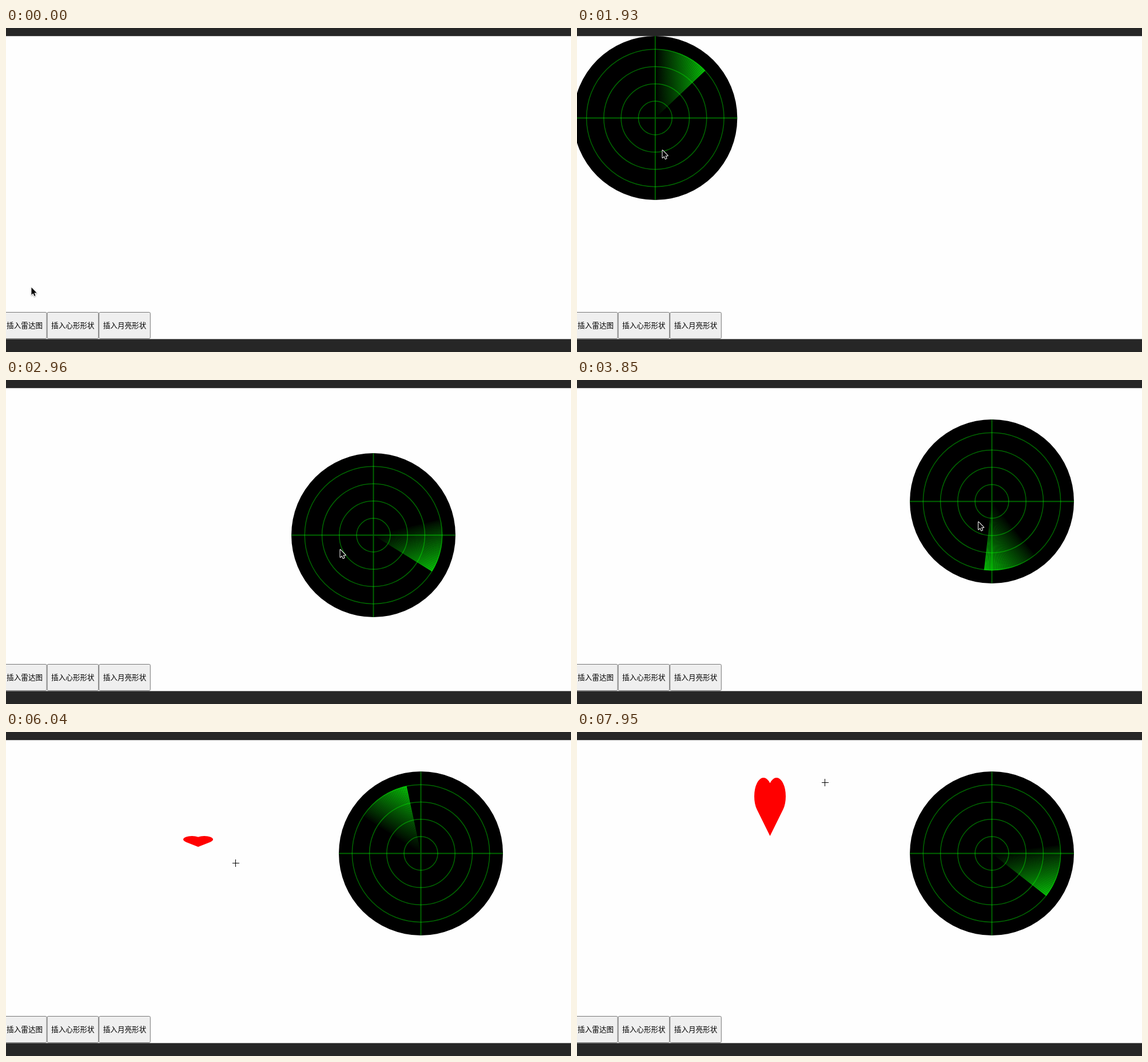
Recreate the animation shown at these times as an HTML page with a canvas. Size 988 px wide and 567 px high, loop 8000 ms.

```html
<!DOCTYPE html>
<html lang="zh">
<head>
<meta charset="utf-8">
<style>
  html, body { margin: 0; height: 100%; overflow: hidden; background: #fefefe; }
  canvas { display: block; }
</style>
</head>
<body>
<canvas id="stage" width="988" height="567"></canvas>
<script>
const ctx = document.getElementById('stage').getContext('2d');
const LOOP = 8000, STEP = 147.2, TAU = Math.PI * 2;
const PRESSES = [8, 32];
const RADAR_IN = 9, GRAB = 15.5, DROP = 25, CROSS_IN = 34, HEART_IN = 40;
const GRIP = [24, -35], ANCHOR = [310, 182];

// The pointer's turning points: [step, x, y]. It also drives the radar and the heart.
const path = [
  [0, 44, 453], [1, 44, 440], [2, 44, 440], [6, 58, 512], [8.5, 58, 512],
  [13, 149, 213], [GRAB, 112.8, 192.5], [20, 584, 296], [20.5, 618.5, 306.5], [22, 680, 316],
  [DROP, 701.5, 247.5], [26, 701.5, 247.5], [30, 116, 515], [33, 116, 515],
  [39, 310, 182], [40.4, 362, 201], [41, 402, 229], [43, 440, 290], [45.5, 310, 304],
  [48.4, 203, 289], [49, 181, 228], [51, 163, 120], [53.4, 365, 80], [54, 434, 88]
];

const clamp = (v, low, high) => Math.min(Math.max(v, low), high);

function slope(i, axis) {
  const a = path[i], b = path[i + 1];
  return a && b ? (b[axis] - a[axis]) / (b[0] - a[0]) : 0;
}

// Harmonic mean of both sides: smooth, without overshoot
function tangent(i, axis) {
  const before = slope(i - 1, axis), after = slope(i, axis);
  return before * after > 0 ? 2 * before * after / (before + after) : 0;
}

function pointerAt(step) {
  const i = clamp(path.findIndex(key => key[0] > step), 1, path.length) - 1;
  const a = path[i], b = path[i + 1];
  if (!b || step >= path[path.length - 1][0]) return path[path.length - 1].slice(1);
  const span = b[0] - a[0], k = (step - a[0]) / span;
  return [1, 2].map(axis => {
    const ease = k * k * (3 - 2 * k);
    return a[axis] + (b[axis] - a[axis]) * ease
      + span * k * (1 - k) * (tangent(i, axis) * (1 - k) - tangent(i + 1, axis) * k);
  });
}

function buttons([px, py], pressed) {
  let x = -6.4;
  ctx.font = '12.6px "Noto Sans CJK SC", "Noto Sans CJK", sans-serif';
  ctx.textBaseline = 'alphabetic';
  ctx.strokeStyle = '#767676';
  ctx.lineWidth = 1;
  for (const label of ['插入雷达图', '插入心形形状', '插入月亮形状']) {
    const width = label.length * 12.6 + 15;
    const over = py > 497 && px >= x && px < x + width;
    ctx.beginPath();
    ctx.roundRect(x + .5, 497.5, width - 1, 46, 2);
    ctx.fillStyle = !over ? '#efefef' : pressed ? '#f5f5f5' : '#e5e5e5';
    ctx.fill();
    ctx.stroke();
    ctx.fillStyle = '#000';
    ctx.fillText(label, x + 7.5, 524.7);
    x += width;
  }
}

function radar(x, y, lead) {
  const radius = 143.5, reach = 120.7, slices = 30, slice = TAU / 8 / slices;
  ctx.save();
  ctx.translate(x, y);
  ctx.fillStyle = '#000';
  ctx.beginPath();
  ctx.arc(0, 0, radius, 0, TAU);
  ctx.fill();

  const glow = ctx.createRadialGradient(0, 0, 0, 0, 0, reach);
  glow.addColorStop(0, '#000');
  glow.addColorStop(1, '#08be08');
  ctx.fillStyle = glow;
  for (let i = 0; i < slices; i++) {
    const end = lead - i * slice;
    ctx.globalAlpha = (1 - i / slices) ** .85;
    ctx.beginPath();
    ctx.moveTo(0, 0);
    ctx.arc(0, 0, reach, end - slice, end);
    ctx.fill();
  }
  ctx.globalAlpha = 1;

  ctx.strokeStyle = 'rgba(0,255,0,.4)';
  ctx.lineWidth = 1.5;
  for (let ring = 1; ring <= 4; ring++) {
    ctx.beginPath();
    ctx.arc(0, 0, ring * 30.25 - .8, 0, TAU);
    ctx.stroke();
  }
  ctx.lineWidth = 1.9;
  ctx.beginPath();
  ctx.moveTo(-radius, 0);
  ctx.lineTo(radius, 0);
  ctx.moveTo(0, -radius);
  ctx.lineTo(0, radius);
  ctx.stroke();
  ctx.restore();
}

// Two round lobes on a tilted square, stretched to the dragged box
function heart([x0, y0], [x1, y1]) {
  const rx = .2929, ry = .3204, q = TAU / 8;
  ctx.save();
  ctx.translate(Math.min(x0, x1), Math.min(y0, y1));
  ctx.scale(Math.abs(x1 - x0), Math.abs(y1 - y0));
  ctx.beginPath();
  ctx.ellipse(rx, ry, rx, ry, 0, 3 * q, 7 * q);
  ctx.ellipse(1 - rx, ry, rx, ry, 0, 5 * q, 9 * q);
  ctx.lineTo(.5, 1);
  ctx.fillStyle = '#f00';
  ctx.fill();
  ctx.restore();
}

const arrowShape = new Path2D('M0 0V13L3 10.2L5.1 15L7 14.2L5 9.5H9.2Z');

function arrow(x, y) {
  ctx.save();
  ctx.translate(x + .5, y + 1);
  ctx.shadowColor = 'rgba(0,0,0,.35)';
  ctx.shadowBlur = 2;
  ctx.shadowOffsetY = 1;
  ctx.strokeStyle = '#fff';
  ctx.lineWidth = 2;
  ctx.lineJoin = 'round';
  ctx.stroke(arrowShape);
  ctx.shadowColor = 'transparent';
  ctx.fillStyle = '#000';
  ctx.fill(arrowShape);
  ctx.restore();
}

function cross(x, y) {
  x = Math.round(x);
  y = Math.round(y);
  ctx.fillStyle = '#000';
  ctx.fillRect(x - 6, y, 12, 1);
  ctx.fillRect(x - 1, y - 6, 1, 13);
}

function draw(time) {
  const n = Math.floor(time % LOOP / STEP);
  const pointer = pointerAt(n);

  ctx.fillStyle = '#fefefe';
  ctx.fillRect(0, 0, 988, 567);
  ctx.fillStyle = '#262626';
  ctx.fillRect(0, 0, 988, 14.2);
  ctx.fillRect(0, 544.4, 988, 23);

  buttons(pointer, PRESSES.includes(n));
  if (n >= RADAR_IN) {
    const [x, y] = pointerAt(clamp(n + .5, GRAB, DROP));
    const degrees = -183.5 + n * 10.77;
    radar(x + GRIP[0], y + GRIP[1], degrees * TAU / 360);
  }
  if (n >= HEART_IN) heart(ANCHOR, pointerAt(n - .6));
  (n >= CROSS_IN ? cross : arrow)(...pointer);
}

function tick() {
  draw(performance.now());
  requestAnimationFrame(tick);
}
tick();
</script>
</body>
</html>
```
